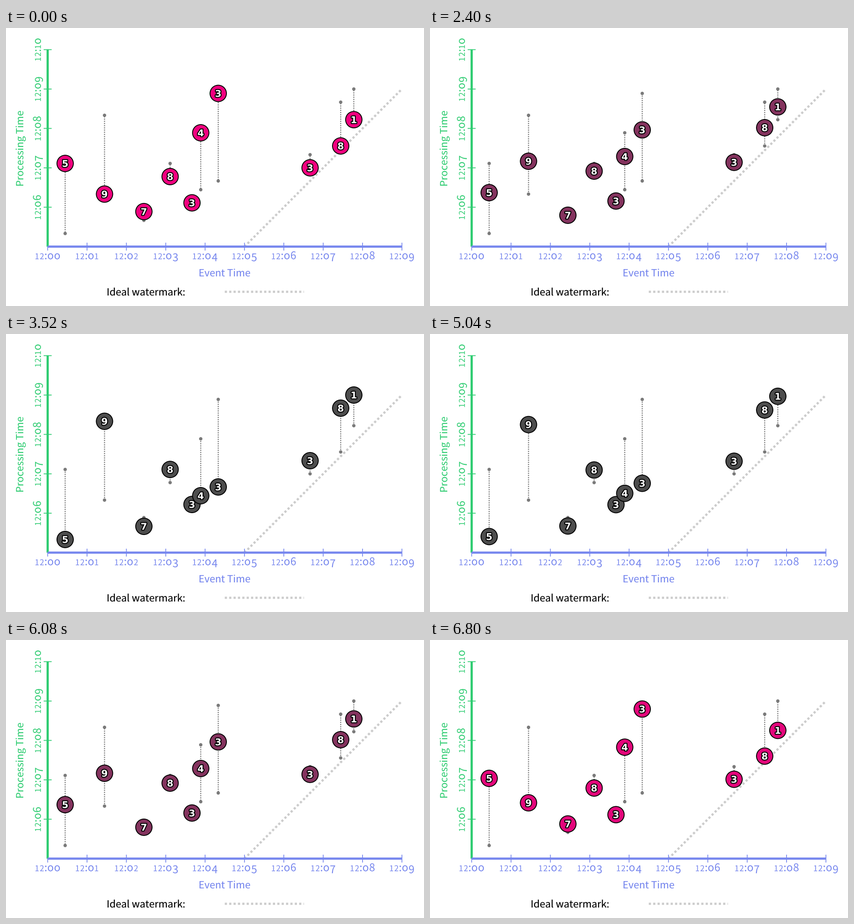
Recreate the animation shown at these times as a matplotlib script. Size 918x610 px, loop 6880 ms.

```python
import numpy as np
import matplotlib.pyplot as plt
from matplotlib.animation import FuncAnimation
from matplotlib.patches import Circle, PathPatch
from matplotlib.path import Path
from matplotlib.patheffects import withStroke
from matplotlib.textpath import TextPath
from matplotlib.transforms import Affine2D

W, H, DPI = 918, 610, 100
PX = 72 / DPI                     # points per pixel
FRAMES, STEP_MS = 86, 80
HOLD, TRAVEL = 20, 24             # frames at rest, frames per trip
X0, Y0, CELL = 91.5, 479.7, 9.605
MINUTE = 9 * CELL
UNIT = CELL / 10                  # base for line widths

FONT = "Noto Sans CJK JP"
GREEN, BLUE = "#2ecc71", "#7787ee"
GRAY, PALE = "#7a7a7a", "#cccccc"
PINK = np.array([240, 0, 127]) / 255
DARK = np.array([77, 77, 77]) / 255

# value, then grid cells: event time, arrival, end of the trip
EVENTS = [(5, 4, 19, 3), (9, 13, 12, 30), (7, 22, 8, 6), (8, 28, 16, 19),
          (3, 33, 10, 11), (4, 35, 26, 13), (3, 39, 35, 15),
          (3, 60, 18, 21), (8, 67, 23, 33), (1, 70, 29, 36)]

plt.rcParams.update({"path.snap": False, "lines.scale_dashes": False,
                     "text.hinting": "none",
                     "lines.dash_capstyle": "butt",
                     "lines.solid_capstyle": "butt"})

fig = plt.figure(figsize=(W / DPI, H / DPI), dpi=DPI, facecolor="white")
ax = fig.add_axes([0, 0, 1, 1])
ax.set_xlim(0, W)
ax.set_ylim(H, 0)
ax.axis("off")


def old_style(c, size):
    """Glyph of an old-style figure: 0-2 at x-height, odd ones and 4 hang."""
    if c == "0":
        c = "o"
    elif c in "12":
        size *= 0.75
    glyph = TextPath((0, 0), c, size=size, prop={"family": FONT})
    drop = 0.19 * size if c in "34579" else 0
    return glyph.transformed(Affine2D().translate(0, -drop))


def label(text, x, y, color, angle=0, size=23.3, gap=3):
    glyphs, pen = [], 0
    for c in text:
        glyph = old_style(c, size)
        box = glyph.get_extents()
        glyphs.append(glyph.transformed(Affine2D().translate(pen - box.x0, 0)))
        pen += box.width + gap
    place = (Affine2D().translate((gap - pen) / 2, 0).scale(1, -1)
             .rotate_deg(-angle).translate(x, y))
    path = Path.make_compound_path(*glyphs).transformed(place)
    ax.add_patch(PathPatch(path, fc=color, lw=0, zorder=3))


def title(text, x, y, color, angle=0):
    ax.text(x, y, text, color=color, family=FONT, size=21.8 * PX,
            ha="center", va="baseline", rotation=angle,
            rotation_mode="anchor")


def line(xs, ys, color, width, dotted=False, z=2):
    w = width * UNIT * PX
    ax.plot(xs, ys, color=color, lw=w, zorder=z,
            ls=(0, (w, w)) if dotted else "-")


# Ideal watermark and its key
line([X0 + 5 * MINUTE, X0 + 9 * MINUTE], [Y0, Y0 - 4 * MINUTE],
     PALE, 5, dotted=True, z=1)
line([480.5, 654.4], [578.8, 578.8], PALE, 5, dotted=True)
title("Ideal watermark:", 307.8, 587, "black")

# Axes
for i in range(1, 6):
    y = Y0 - i * MINUTE
    line([X0 - 8.8, X0 + 8.8], [y, y], GREEN, 1.8)
    label(f"12:{5 + i:02d}", 76.5, y, GREEN, angle=90)
for i in range(10):
    x = X0 + i * MINUTE
    line([x, x], [Y0 - 8.6, Y0 + 8.6], BLUE, 1.8)
    label(f"12:{i:02d}", x, 507.3, BLUE)
line([X0, X0], [Y0, Y0 - 5 * MINUTE], GREEN, 5, z=3)
line([X0, X0 + 9 * MINUTE], [Y0, Y0], BLUE, 5, z=3)
title("Processing Time", 40, 263.5, GREEN, 90)
title("Event Time", 480, 546.2, BLUE)

# Events: a dotted track with an end dot each, and a numbered ball
balls = []
for i, (value, *cells) in enumerate(EVENTS):
    x = X0 + cells[0] * CELL
    start, end = (Y0 - c * CELL for c in cells[1:])
    line([x, x], [start, end], GRAY, 2.5, dotted=True, z=4)
    for y in (start, end):
        ax.add_patch(Circle((x, y), 3.7, fc=GRAY, lw=0, zorder=5))
    ball = Circle((x, start), 18, ec="black", lw=2 * UNIT * PX, zorder=6 + i)
    ax.add_patch(ball)
    digit = ax.text(x, start, str(value), color="white", weight="bold",
                    family="DejaVu Sans", size=20.5 * PX,
                    ha="center", va="baseline", zorder=6.5 + i,
                    path_effects=[withStroke(linewidth=4.2 * PX,
                                             foreground="black")])
    balls.append((ball, digit, x, start, end))


def draw(n):
    t = min(max(min(n - HOLD, FRAMES - n) / TRAVEL, 0), 1)
    color = DARK + (PINK - DARK) * (1 - t) ** 2
    for ball, digit, x, start, end in balls:
        y = start + (end - start) * t
        ball.center = (x, y)
        ball.set_facecolor(color)
        digit.set_position((x, y + 7.5))
    return [artist for b in balls for artist in b[:2]]


anim = FuncAnimation(fig, draw, frames=FRAMES, init_func=lambda: draw(0),
                     interval=STEP_MS, repeat=True, repeat_delay=0)
plt.show()
```
